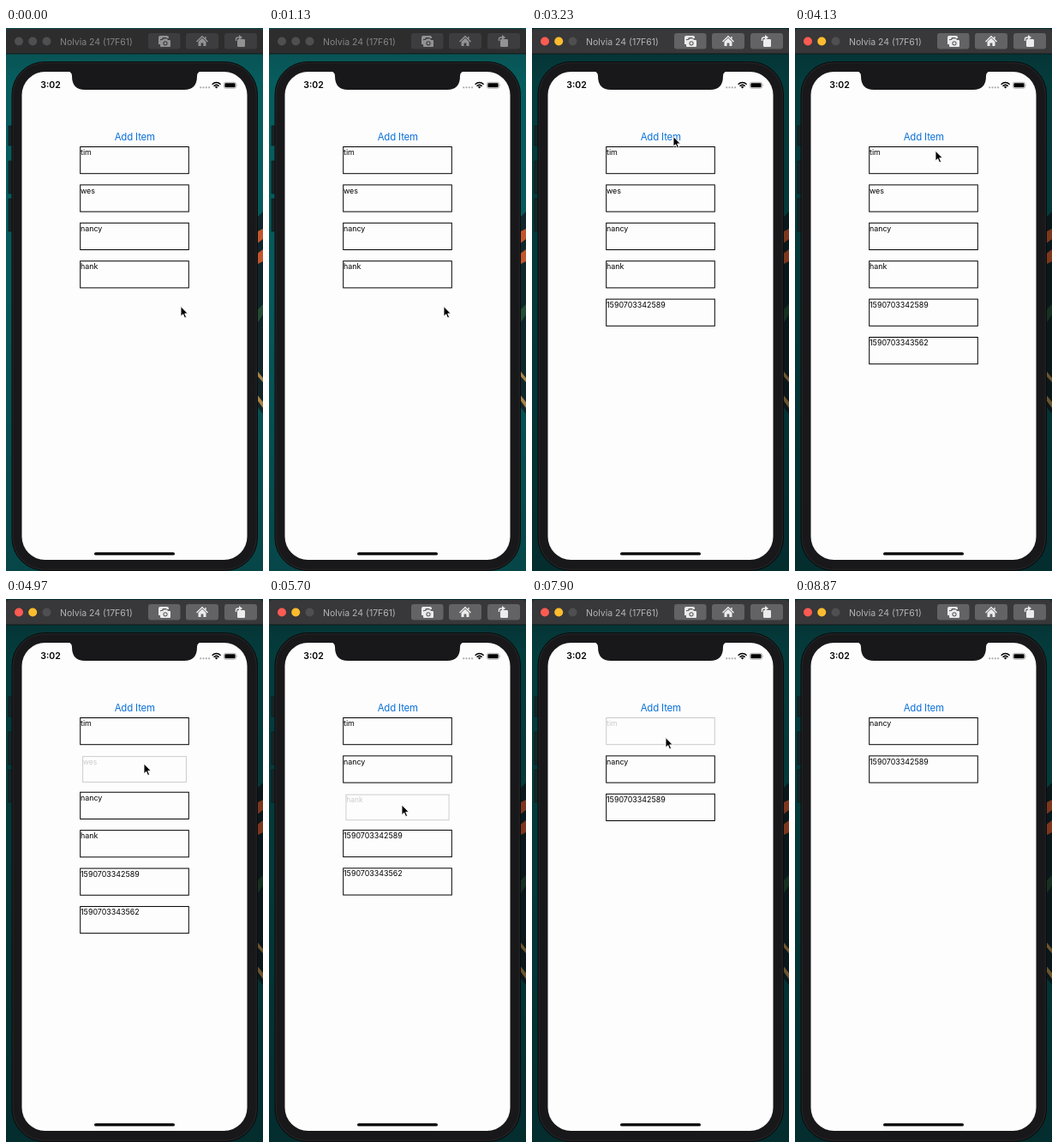
Write an HTML page that moves like this. It is 300x633 px and loops after 8.91 s.

```html
<!DOCTYPE html>
<html lang="en">
<head>
<meta charset="utf-8">
<title>List animation</title>
<style>
html, body { margin: 0; width: 100%; height: 100%; overflow: hidden; background: #075254; }
svg { display: block; width: 300px; height: 633px; font-family: Inter, Roboto, sans-serif;
  --bar: #2d2d2e; --key: #3d3c3e; --icon: #929293; --title: #858586; --red: #4f4e50; --yellow: #4f4e50; --shade: 0; }
svg.on { --bar: #383739; --key: #636264; --icon: #ececec; --title: #b4b3b5; --red: #ff5b52; --yellow: #fdbc2e; --shade: .36; }
.key { fill: var(--key); }
.icon { fill: var(--icon); }
.line { fill: none; stroke: var(--icon); }
</style>
</head>
<body>
<svg id="stage" viewBox="0 0 300 633">
  <defs>
    <linearGradient id="wall" x2="0" y2="1">
      <stop offset="0" stop-color="#0a4a4c"/>
      <stop offset=".1" stop-color="#075d5e"/>
      <stop offset=".5" stop-color="#06585a"/>
      <stop offset="1" stop-color="#074648"/>
    </linearGradient>
  </defs>

  <!-- desktop -->
  <rect width="300" height="633" fill="url(#wall)"/>
  <path d="M292 222L300 214V450L292 440Z" fill="#10262a"/>
  <path d="M292 238L300 234V246L292 252ZM292 264L300 258V272L292 276Z" fill="#c2562d"/>
  <path d="M292 330L300 322V334L292 346Z" fill="#234d35"/>
  <path d="M292 398L300 408V413L292 404ZM292 426L300 436V443L292 432Z" fill="#a88448"/>
  <rect width="300" height="633" style="opacity:var(--shade)"/>

  <!-- window bar -->
  <path d="M0 30V5Q0 1 4 1H296Q300 1 300 5V30Z" style="fill:var(--bar)"/>
  <path d="M0 30H300" stroke="#111" stroke-width=".8"/>
  <circle cx="15" cy="15.5" r="5" style="fill:var(--red)"/>
  <circle cx="31.2" cy="15.5" r="5" style="fill:var(--yellow)"/>
  <circle cx="47.5" cy="15.5" r="5" fill="#4f4e50"/>
  <text x="63" y="19.6" font-size="10.5" style="fill:var(--title)">Nolvia 24 (17F61)</text>
  <g class="key">
    <rect x="166" y="6" width="37.5" height="18.5" rx="3"/>
    <rect x="210" y="6" width="38" height="18.5" rx="3"/>
    <rect x="255" y="6" width="38" height="18.5" rx="3"/>
  </g>
  <path class="icon" d="M178 19V11Q178 9 180 9H188Q190 9 190 11V12H188L187 11H183L182 13H180V19Z"/>
  <path class="icon" d="M181 14H183L184 12.5H188L189 14H191Q192 14 192 15V21Q192 22 191 22H181Q180 22 180 21V15Q180 14 181 14Z"/>
  <circle class="key" cx="186" cy="17.8" r="2.6"/>
  <circle class="icon" cx="186" cy="17.8" r="1.5"/>
  <path class="line" d="M222.5 16L229 9.8L235.5 16M233 10V12.5" stroke-width="1.4"/>
  <path class="icon" d="M224.5 16L229 11.8L233.5 16V21H230.4V17.5H227.6V21H224.5Z"/>
  <rect class="icon" x="270" y="13" width="9" height="9" rx="1.3"/>
  <path class="line" d="M268.5 15V13Q268.5 11 270.5 11H273" stroke-width="1.4"/>
  <path class="icon" d="M272 8L276 11L272 14Z"/>

  <!-- phone -->
  <path d="M3 114H8V137H3ZM3 155H8V193H3ZM3 199H8V237H3Z" fill="#172527" stroke="#0c1719" stroke-width=".6"/>
  <rect x="7" y="39.5" width="286.5" height="593" rx="38" fill="#18181a" stroke="#0a0b0c"/>
  <rect x="8.2" y="40.7" width="284" height="590.5" rx="37" fill="none" stroke="#2b2b2d" stroke-width=".7"/>
  <rect x="18.5" y="51" width="263" height="569" rx="27" fill="#fefdfe"/>
  <path d="M72 50.5Q77 51 77 56Q77 72 92 72H208Q223 72 223 56Q223 51 228 50.5Z" fill="#18181a"/>
  <text x="40.3" y="70.4" font-size="10.5" font-weight="600">3:02</text>
  <g fill="#aaa">
    <circle cx="227.2" cy="69.3" r="1.1"/><circle cx="230.5" cy="69.3" r="1.1"/>
    <circle cx="233.8" cy="69.3" r="1.1"/><circle cx="237.1" cy="69.3" r="1.1"/>
  </g>
  <path d="M240.6 65.8Q245.6 61.3 250.6 65.8M242.5 67.7Q245.6 65 248.7 67.7" fill="none" stroke="#000" stroke-width="1.5"/>
  <path d="M243.8 68.8Q245.6 67.3 247.4 68.8L245.6 70.6Z"/>
  <rect x="254.4" y="63.3" width="14.2" height="7" rx="2" fill="none" stroke="#999" stroke-width=".7"/>
  <rect x="255.4" y="64.3" width="12.2" height="5" rx="1.1"/>
  <path d="M269.6 65.5Q271 66.8 269.6 68.1Z" fill="#999"/>
  <rect x="103" y="611.2" width="94" height="3.4" rx="1.7"/>

  <text id="add" x="150.3" y="130.7" font-size="11.4" letter-spacing="-.15" text-anchor="middle" fill="#0870d8">Add Item</text>
  <g id="list"></g>
  <path id="cursor" d="M0 0V11.7L2.7 9.2L4.6 13.6L6.6 12.7L4.7 8.4H8.3Z" stroke="#fff" stroke-width=".9"/>
</svg>
<script>
const LOOP = 8910, PITCH = 44.4, MORPH = 300, ACTIVE = 2430;
const ADDS = [2750, 3723];
const $ = id => document.getElementById(id);

// pressed / gone: touch-down and removal times
const items = [
  { label: 'tim', pressed: 7720, gone: 7920 },
  { label: 'wes', pressed: 4760, gone: 4932 },
  { label: 'nancy' },
  { label: 'hank', pressed: 5530, gone: 5660 },
  { label: '1590703342589', born: ADDS[0] },
  { label: '1590703343562', born: ADDS[1], pressed: 6660, gone: 6800 }
];

// pointer stops: time, x, y
const stops = [
  [0, 204, 324.5], [1150, 204, 324.5], [2000, 175.5, 122.5], [2480, 175.5, 122.5],
  [2680, 165, 126.5], [3900, 165, 126.5], [4600, 161, 192], [5060, 161, 192],
  [5450, 155, 240], [5850, 155, 240], [6300, 152.5, 276], [6950, 152.5, 276],
  [7600, 156, 161.5], [8150, 156, 161.5], [8650, 304, 190], [LOOP, 304, 190]
];

const clamp = v => Math.max(0, Math.min(1, v));
const smooth = v => (v = clamp(v), v * v * (3 - 2 * v));
const mix = (a, b, k) => a + (b - a) * k;
const dim = (t, down, span = 150) => 1 - .8 * smooth((t - down) / span);

function pointer(t) {
  const i = stops.findIndex(s => s[0] > t);
  const a = stops[i - 1], b = stops[i], k = smooth((t - a[0]) / (b[0] - a[0]));
  return [mix(a[1], b[1], k), mix(a[2], b[2], k)];
}

function addOpacity(t) {
  return Math.min(...ADDS.map(up => {
    const down = up - 120;
    return t < up ? dim(t, down) : mix(dim(up, down), 1, smooth((t - up) / 250));
  }));
}

for (const item of items) {
  $('list').insertAdjacentHTML('beforeend',
    `<g><rect x="-63.3" y="-15.6" width="126.6" height="31.2" fill="none" stroke="#000"/>
     <text x="-63" y="-6" font-size="8.9">${item.label}</text></g>`);
  item.node = $('list').lastChild;
}

function draw(t) {
  $('stage').classList.toggle('on', t >= ACTIVE);
  $('add').setAttribute('opacity', addOpacity(t));
  let slot = 0;
  for (const { node, born = -MORPH, pressed = Infinity, gone = Infinity } of items) {
    const stay = 1 - smooth((t - gone) / MORPH);
    const scale = stay * smooth((t - born) / MORPH);
    const y = 154.1 + slot * PITCH;
    node.setAttribute('transform', `translate(150 ${y}) scale(${scale})`);
    node.setAttribute('opacity', dim(t, pressed));
    node.setAttribute('visibility', scale > 0 ? 'visible' : 'hidden');
    slot += stay;
  }
  $('cursor').setAttribute('transform', `translate(${pointer(t)})`);
}

function tick() {
  draw(performance.now() % LOOP);
  requestAnimationFrame(tick);
}
tick();
</script>
</body>
</html>
```
